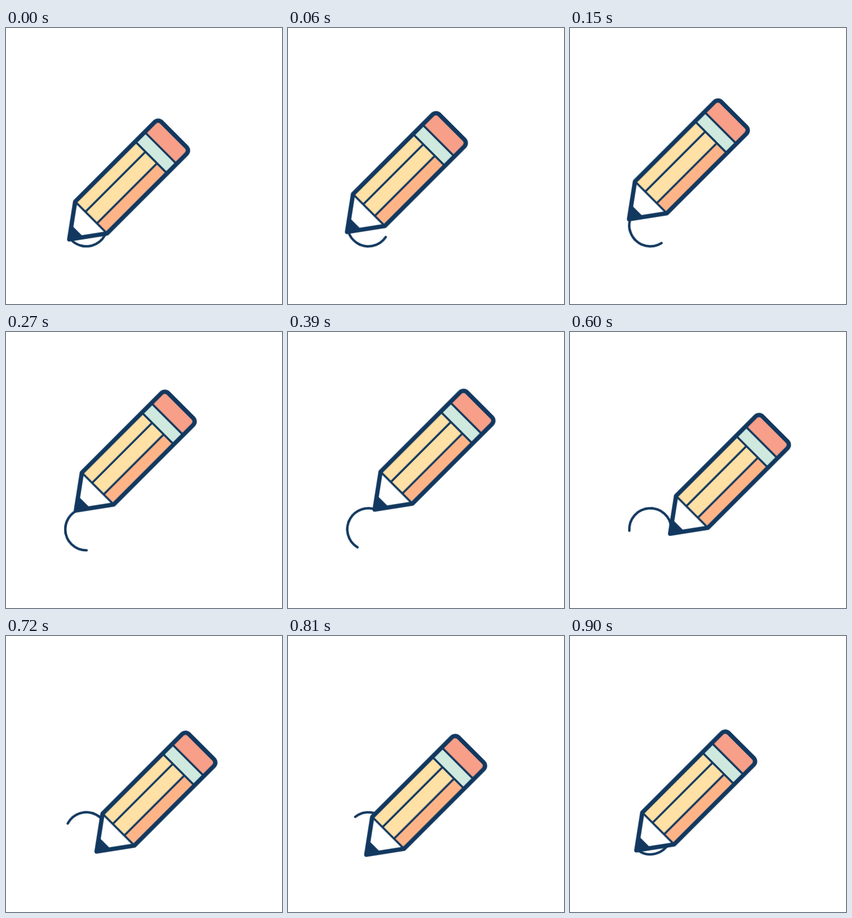
These frames come from a looping animation (512 by 512 pixels, 930 ms). An HTML page:

```html
<!DOCTYPE html>
<html lang="en">
<head>
<meta charset="utf-8">
<title>Pencil drawing a circle</title>
<style>
  html, body { margin: 0; width: 100%; height: 100%; overflow: hidden; background: #fff; }
  svg { display: block; width: 100vw; height: 100vh; }

  .ink { fill: none; stroke: #12385f; stroke-linejoin: round; }
  .trail, .orbit { animation: 930ms steps(31) -3ms infinite; }
  .trail { stroke-width: 4.5; stroke-linecap: round; animation-name: trail; }
  .orbit { animation-name: orbit; }

  @keyframes orbit {
    from { transform: rotate(139.2deg) translate(39.4px) rotate(-139.2deg); }
    to   { transform: rotate(499.2deg) translate(39.4px) rotate(-499.2deg); }
  }
  /* The tail moves slower than the tip, so the line grows. */
  @keyframes trail {
    from { transform: rotate(18.2deg); stroke-dasharray: 121 360; }
    to   { transform: rotate(263deg);  stroke-dasharray: 236.2 360; }
  }
</style>
</head>
<body>
<svg viewBox="0 0 512 512">
  <g transform="translate(149 366)">
    <circle class="ink trail" r="39" pathLength="360"/>
  </g>
  <g transform="translate(147.1 366.4)">
    <g class="orbit">
      <!-- Pencil lies along x with its tip at the origin. -->
      <g transform="rotate(-45)">
        <path fill="#fff" d="M0 0L57.4-41.7V41.7Z"/>
        <path fill="#12385f" d="M0 0L21.9-15.9V15.9Z"/>
        <path fill="#ffe0a5" d="M57.4-41.7H215V15.3H57.4Z"/>
        <path fill="#ffb488" d="M57.4 15.3H215V41.7H57.4Z"/>
        <path fill="#cfe9df" d="M215-41.7H239.8V41.7H215Z"/>
        <path fill="#f79f88" d="M239.8-41.7H266a9 9 0 0 1 9 9V32.7a9 9 0 0 1-9 9H239.8Z"/>
        <path class="ink" stroke-width="3.8" d="M57.4-41.7V41.7M215-41.7V41.7M239.8-41.7V41.7M57.4-14.9H215M57.4 15.3H215"/>
        <path class="ink" stroke-width="8" d="M0 0L57.4-41.7H266a9 9 0 0 1 9 9V32.7a9 9 0 0 1-9 9H57.4Z"/>
      </g>
    </g>
  </g>
</svg>
</body>
</html>
```
